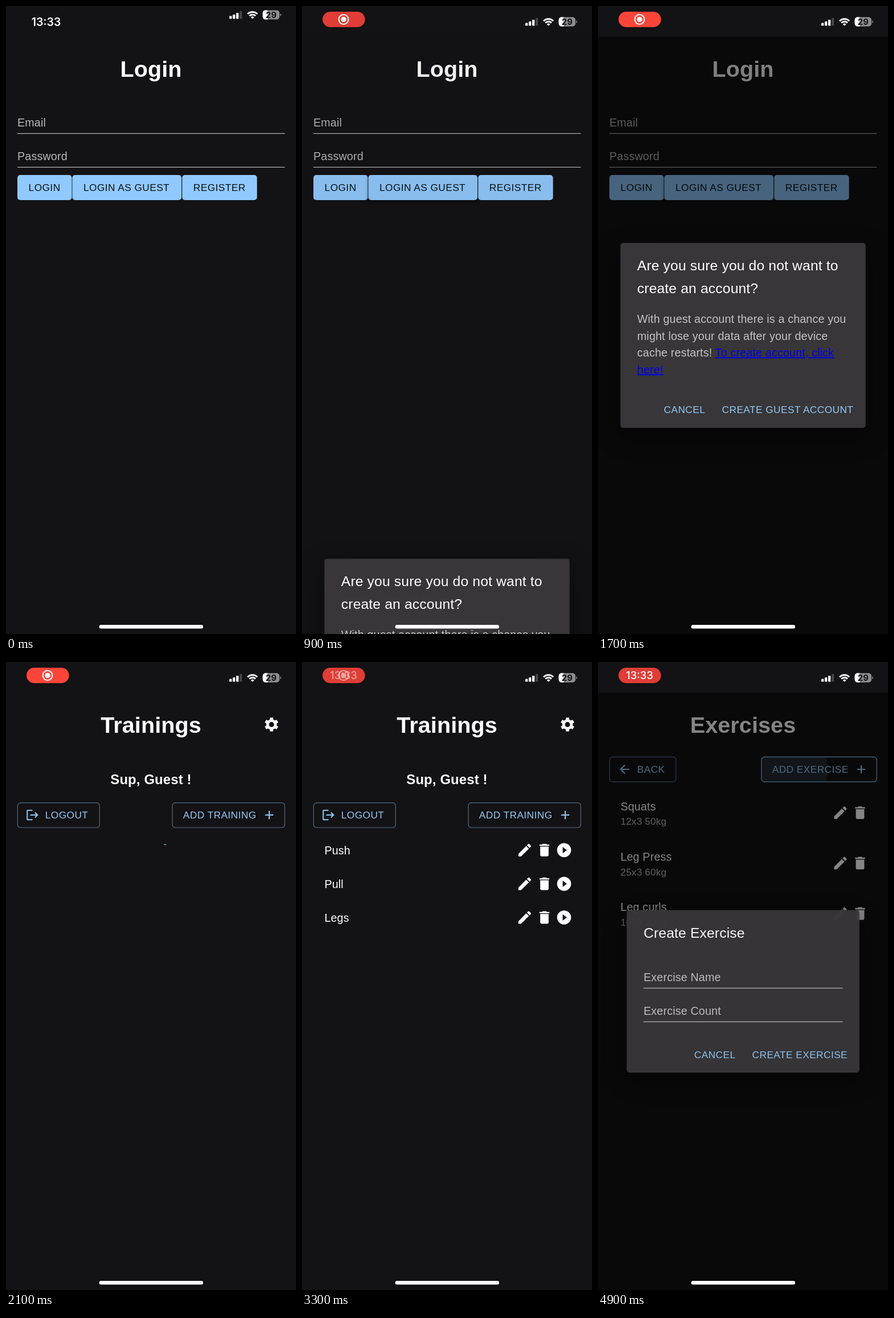
Write an HTML page that moves like this. It is 509x1100 px and loops after 5000 ms.

```html
<!DOCTYPE html>
<html lang="en">
<head>
<meta charset="utf-8">
<title>Training app</title>
<style>
  html, body { margin: 0; width: 100%; height: 100%; overflow: hidden; background: #131214; }
  svg { display: block; width: 509px; height: 1100px; }
  text { font: 19.67px "Liberation Sans", Arial, sans-serif; fill: #fff; letter-spacing: .18px; white-space: pre; }
  text.title { font-size: 39.4px; font-weight: bold; text-anchor: middle; }
  text.greeting { font-size: 23.8px; font-weight: bold; text-anchor: middle; }
  text.heading { font-size: 24.6px; }
  text.soft { fill: #fff; fill-opacity: .7; }
  text.small { font-size: 17.2px; fill-opacity: .7; }
  text.button { font-size: 17.2px; letter-spacing: .49px; fill: #90caf9; }
  text.onFill { fill: #0d1114; }
  text.clock { font: 600 19.5px Inter, sans-serif; letter-spacing: 0; text-anchor: middle; }
  .link { fill: #00e; fill-opacity: 1; text-decoration: underline; }
  .paper { fill: #383638; filter: drop-shadow(0 14px 22px rgba(0, 0, 0, .45)); }
  .outline { fill: none; stroke: #90caf9; stroke-opacity: .5; stroke-width: 1.2; }
  .raised { filter: drop-shadow(0 2px 3px rgba(0, 0, 0, .4)); }
</style>
</head>
<body>
<svg id="stage" viewBox="0 0 509 1100"></svg>
<script>
const BLUE = '#90caf9';
const PATHS = {
  edit: 'M3 17.25V21h3.75L17.81 9.94l-3.75-3.75L3 17.25zM20.71 7.04c.39-.39.39-1.02 0-1.41l-2.34-2.34c-.39-.39-1.02-.39-1.41 0l-1.83 1.83 3.75 3.75 1.83-1.83z',
  trash: 'M6 19c0 1.1.9 2 2 2h8c1.1 0 2-.9 2-2V7H6v12zM19 4h-3.5l-1-1h-5l-1 1H5v2h14V4z',
  play: 'M2 12a10 10 0 0 1 20 0a10 10 0 0 1-20 0zM10 16.5v-9l6 4.5z',
  logout: 'M17 7l-1.41 1.41L18.17 11H8v2h10.17l-2.58 2.58L17 17l5-5zM4 5h8V3H4c-1.1 0-2 .9-2 2v14c0 1.1.9 2 2 2h8v-2H4V5z',
  back: 'M20 11H7.83l5.59-5.59L12 4l-8 8 8 8 1.41-1.41L7.83 13H20v-2z',
  plus: 'M19 13h-6v6h-2v-6H5v-2h6V5h2v6h6v2z'
};

// Drawing helpers
const text = (label, x, y, cls = '') => `<text class="${cls}" x="${x}" y="${y}">${label}</text>`;
const rect = (x, y, w, h, r, attrs) => `<rect x="${x}" y="${y}" width="${w}" height="${h}" rx="${r}" ${attrs}/>`;
const group = (id, content, attrs = '') => `<g id="${id}" ${attrs}>${content}</g>`;
const icon = (name, x, y, scale = 1.23, color = '#fff') =>
  `<path d="${PATHS[name]}" fill="${color}" fill-rule="evenodd" transform="translate(${x} ${y}) scale(${scale}) translate(-12 -12)"/>`;
const smallIcon = (name, x, y) => icon(name, x, y, 1.025, BLUE);
const field = (label, x, w, y) => text(label, x, y, 'soft') + rect(x, y + 11.4, w, 1.2, 0, 'fill="#fff" fill-opacity=".7"');
const filled = (label, x, w, id = '') =>
  rect(x, 296, w, 44, 5, `id="${id}" fill="#90c9fd"`) + text(label, x + 19.6, 324.2, 'button onFill');
const outlined = (label, x, w, y, textX, id = '') =>
  rect(x, y, w, 43.4, 5, `class="outline" id="${id}"`) + text(label, textX, y + 27.8, 'button');

const teeth = [0, 60, 120, 180, 240, 300].map(a => `<path d="M0-6V-9.8" stroke-width="4.7" transform="rotate(${a})"/>`).join('');
const gear = `<g transform="translate(466 109.5) scale(1.23)" fill="none" stroke="#fff"><circle r="5.6" stroke-width="4"/>${teeth}</g>`;

const login = text('Login', 254.5, 123.5, 'title') +
  field('Email', 20, 469.4, 211.4) + field('Password', 20, 469.4, 270.4) +
  filled('LOGIN', 20, 95.5) + filled('LOGIN AS GUEST', 116.4, 191.6, 'guest') + filled('REGISTER', 309.2, 131.4);

const trainingList = ['Push', 'Pull', 'Legs'].map((name, i) => {
  const y = 329.5 + 59 * i;
  return text(name, 39.4, y + 7.3) + icon('edit', 391, y) + icon('trash', 425.5, y) + icon('play', 460, y);
}).join('');

const trainings = text('Trainings', 254.5, 123.5, 'title') + gear +
  text('Sup, Guest !', 254.5, 213.6, 'greeting') +
  outlined('LOGOUT', 20.4, 143.8, 246.6, 68.8) + smallIcon('logout', 46.5, 268) +
  outlined('ADD TRAINING', 292, 197.2, 246.6, 310.8) + smallIcon('plus', 462, 268) +
  `<circle id="spinner" r="20.2" fill="none" stroke="${BLUE}" stroke-width="3.6"/>` +
  group('trainingList', trainingList);

const exerciseList = [['Squats', '12x3 50kg'], ['Leg Press', '25x3 60kg'], ['Leg curls', '10x3 30kg']].map(([name, sets], i) => {
  const y = 264 + 88.3 * i;
  return text(name, 39.4, y - 4.3) + text(sets, 39.4, y + 21.4, 'small') + icon('edit', 425.5, y) + icon('trash', 460, y);
}).join('');

const exercises = text('Exercises', 254.5, 123.5, 'title') +
  outlined('BACK', 20.4, 116.4, 166.4, 68.8) + smallIcon('back', 46.5, 188) +
  `<clipPath id="buttonClip">${rect(287, 166.4, 202.2, 43.4, 5, '')}</clipPath>` +
  `<circle id="ripple" cx="330" cy="188" fill="${BLUE}" fill-opacity=".12" clip-path="url(#buttonClip)"/>` +
  outlined('ADD EXERCISE', 287, 202.2, 166.4, 305.8, 'addExercise') + smallIcon('plus', 462, 188) + exerciseList;

const guestDialog = rect(39.3, 415, 430.4, 324, 5, 'class="paper"') +
  text('Are you sure you do not want to', 68.8, 463.3, 'heading') + text('create an account?', 68.8, 502.6, 'heading') +
  text('With guest account there is a chance you', 68.8, 555.2, 'soft') +
  text('might lose your data after your device', 68.8, 584.7, 'soft') +
  text('cache restarts! <tspan class="link">To create account, click</tspan>', 68.8, 614.2, 'soft') +
  text('<tspan class="link">here!</tspan>', 68.8, 643.7, 'soft') +
  text('CANCEL', 115.6, 713.4, 'button') + text('CREATE GUEST ACCOUNT', 217.6, 713.4, 'button');

const exerciseDialog = rect(50.4, 434.6, 408.4, 284.6, 5, 'class="paper"') +
  text('Create Exercise', 80, 482.6, 'heading') +
  field('Exercise Name', 80, 349.4, 559.2) + field('Exercise Count', 80, 349.4, 618.2) +
  text('CANCEL', 168.8, 694, 'button') + text('CREATE EXERCISE', 270.6, 694, 'button');

const bars = [5, 7.5, 10.5, 13.5].map((h, i) =>
  rect(392 + 6 * i, 34.6 - h, 4.3, h, 1.2, `fill="${i < 3 ? '#fff' : '#454447'}"`)).join('');
const wifi = `<g transform="translate(432.6 34.8)" fill="none" stroke="#fff" stroke-width="2.9">
  <path d="M-8.5-8.5A12 12 0 0 1 8.5-8.5M-5.4-5.4A7.7 7.7 0 0 1 5.4-5.4"/>
  <path d="M0 0L-2.9-2.9A4.1 4.1 0 0 1 2.9-2.9z" fill="#fff" stroke="none"/></g>`;
const battery = `<clipPath id="batteryClip">${rect(450.6, 19.6, 29.4, 16.2, 5, '')}</clipPath>` +
  `<g clip-path="url(#batteryClip)">${rect(450, 19, 31, 18, 0, 'fill="#8d8c90"')}${rect(450, 19, 9, 18, 0, 'fill="#fff"')}</g>` +
  '<path d="M481.2 25.2a2.6 2.6 0 0 1 0 5z" fill="#8d8c90"/>' +
  '<text class="clock" x="465.4" y="33.2" style="font-size:15px;font-weight:700;fill:#131214">29</text>';

const recordMark = '<circle cx="73" cy="23.5" r="8.4" fill="none" stroke="#fff" stroke-width="2"/><circle cx="73" cy="23.5" r="4.6" fill="#fff"/>';
const pill = rect(36, 10, 74.6, 27, 13.5, 'id="pillShape" fill="#ff453a"') + group('recordMark', recordMark) +
  '<text id="pillClock" class="clock" x="73" y="30.1" style="font-size:18.4px;font-weight:500">13:33</text>';

document.getElementById('stage').innerHTML =
  rect(0, 0, 509, 1100, 0, 'fill="#131214"') +
  group('login', login) + group('trainings', trainings) + group('exercises', exercises) +
  rect(0, 54, 509, 1046, 0, 'id="backdrop"') +
  group('guestDialog', guestDialog) + group('exerciseDialog', exerciseDialog) +
  group('statusIcons', bars + wifi + battery) +
  '<text id="clock" class="clock" x="70.5" y="35">13:33</text>' + group('pill', pill) +
  rect(163.6, 1084, 182.4, 6.4, 3.2, 'fill="#fff"');

// Timing helpers
const part = id => document.getElementById(id);
const set = (id, name, value) => part(id).setAttribute(name, value);
const show = (id, visible) => set(id, 'visibility', visible ? 'inherit' : 'hidden');
const ramp = (t, start, length) => Math.min(1, Math.max(0, (t - start) / length));
const mix = (a, b, p) => a + (b - a) * p;

// Cubic bezier easing with y handles 0 and 1
function ease(x1, x2, x) {
  let low = 0, high = 1;
  for (let i = 0; i < 24; i++) {
    const s = (low + high) / 2, r = 1 - s;
    if (3 * r * r * s * x1 + 3 * r * s * s * x2 + s ** 3 < x) low = s; else high = s;
  }
  return low * low * (3 - 2 * low);
}
const easeOut = x => ease(0, .2, x);
const easeInOut = x => ease(.4, .2, x);

const LOOP = 5000, STEP = 100, TRANSITION = 160;
const TRAININGS_AT = 2085, LIST_AT = 2280, EXERCISES_AT = 3900;

function drawSpinner(t) {
  const p = ramp(t, TRAININGS_AT + 5, 1000);
  const first = easeInOut(ramp(p, 0, .5)), second = easeInOut(ramp(p, .5, .5));
  set('spinner', 'transform', `translate(254.5 317.5) scale(1.23) rotate(${p * 360})`);
  set('spinner', 'stroke-dasharray', `${mix(1, 100, first)} 200`);
  set('spinner', 'stroke-dashoffset', -(15 * first + 110 * second));
}

function drawStatus(t) {
  set('statusIcons', 'transform', `translate(0 ${-12.2 * (1 - easeInOut(ramp(t, 0, 400)))})`);
  set('clock', 'opacity', 1 - ramp(t, 150, 250));
  set('pill', 'opacity', ramp(t, 250, 250));
  const pulse = Math.cos((t - 1100) / 1000 * Math.PI);
  set('pillShape', 'opacity', 1 - .15 * Math.max(0, Math.min(1, pulse + .1)));
  const swap = ramp(t, 3200, 200);
  set('recordMark', 'opacity', 1 - swap);
  set('pillClock', 'opacity', swap);
}

function draw(t) {
  const onLogin = t < TRAININGS_AT, onExercises = t >= EXERCISES_AT;
  show('login', onLogin);
  show('trainings', !onLogin && !onExercises);
  show('exercises', onExercises);
  show('spinner', t < LIST_AT);
  show('trainingList', t >= LIST_AT);
  if (!onLogin && t < LIST_AT) drawSpinner(t);

  set('guest', 'class', t > 850 ? 'raised' : '');
  show('guestDialog', onLogin && t > 891);
  set('guestDialog', 'transform', `translate(0 ${685 * (1 - easeOut(ramp(t, 891, TRANSITION)))})`);

  const fade = easeInOut(ramp(t, 4778, TRANSITION));
  set('exerciseDialog', 'opacity', fade);
  set('backdrop', 'opacity', .5 * (onLogin ? easeInOut(ramp(t, 870, TRANSITION)) : fade));
  set('addExercise', 'style', t > 4700 ? 'stroke-opacity:1' : '');
  set('ripple', 'r', 73 * ramp(t, 4700, 200));

  drawStatus(t);
}

function tick() {
  draw(Math.floor(performance.now() % LOOP / STEP) * STEP);
  requestAnimationFrame(tick);
}
tick();
</script>
</body>
</html>
```
